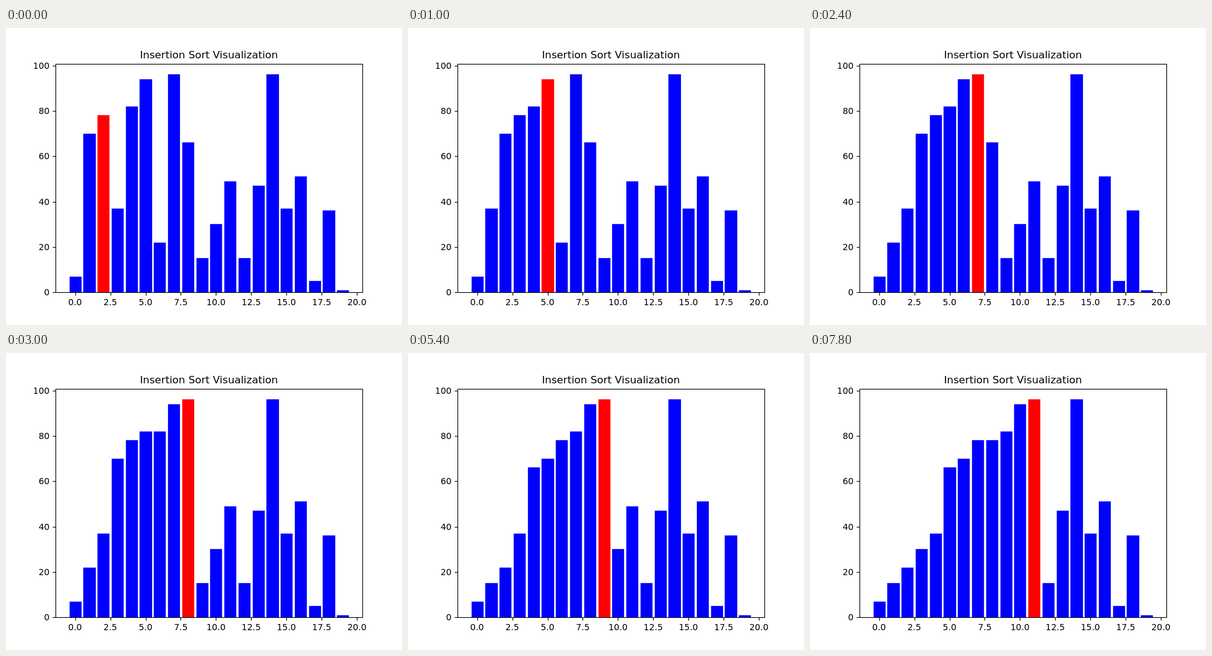
Write an HTML page that moves like this. It is 640 by 480 pixels and loops after 8000 ms.

```html
<!DOCTYPE html>
<html lang="en">
<head>
<meta charset="utf-8">
<title>Insertion Sort Visualization</title>
<style>
  html, body { margin: 0; width: 100%; height: 100%; overflow: hidden; background: #fff; }
  svg { display: block; }
  text { font-family: "DejaVu Sans", sans-serif; font-size: 13.889px; }
  .title { font-size: 16.667px; }
  .axis { fill: none; stroke: #000; stroke-width: 1.111; }
</style>
</head>
<body>
<svg id="chart" width="640" height="480" viewBox="0 0 640 480"></svg>
<script>
const STEP_MS = 200, STEP_COUNT = 40;
const VALUES = [7, 70, 78, 37, 82, 94, 22, 96, 66, 15, 30, 49, 15, 47, 96, 37, 51, 5, 36, 1];
const LEFT = 80, RIGHT = 576, TOP = 57.6, BOTTOM = 427.2;
const BAR_WIDTH = 0.8, EDGE = 0.694;   // EDGE: half the bar outline, in pixels

const chart = document.getElementById('chart');
const toX = value => LEFT + (value + 1.39) * (RIGHT - LEFT) / 21.78;
const toY = value => BOTTOM - value * (BOTTOM - TOP) / 100.8;
const snap = pixel => Math.floor(pixel + 0.5) + 0.5;

function add(tag, attributes, content = '') {
  const node = document.createElementNS(chart.namespaceURI, tag);
  for (const name in attributes) node.setAttribute(name, attributes[name]);
  node.textContent = content;
  return chart.appendChild(node);
}

// One state per shift and one per finished insertion, starting with the third item.
function sortStates(values) {
  const list = [...values], states = [];
  for (let active = 2; active < list.length; active++) {
    const key = list[active];
    const record = () => states.push({ list: [...list], active });
    let slot = active;
    while (slot > 0 && list[slot - 1] > key) {
      list[slot] = list[--slot];
      record();
    }
    list[slot] = key;
    record();
  }
  return states.slice(0, STEP_COUNT);
}

const bars = VALUES.map((_, i) => {
  const left = snap(toX(i - BAR_WIDTH / 2)) - EDGE;
  const right = snap(toX(i + BAR_WIDTH / 2)) + EDGE;
  return add('rect', { x: left, width: right - left });
});

function drawAxes() {
  for (let value = 0; value <= 20; value += 2.5) {
    const x = toX(value);
    add('path', { class: 'axis', d: `M${snap(x)} 427.5v5` });
    add('text', { x, y: 448, 'text-anchor': 'middle' }, value.toFixed(1));
  }
  for (let value = 0; value <= 100; value += 20) {
    const y = toY(value);
    add('path', { class: 'axis', d: `M75.5 ${snap(y)}h5` });
    add('text', { x: 70.3, y: Math.round(y + 5.06), 'text-anchor': 'end' }, value);
  }
  add('rect', { class: 'axis', x: 80.5, y: 58.5, width: 496, height: 369 });
  add('text', { class: 'title', x: 328, y: 49, 'text-anchor': 'middle' }, 'Insertion Sort Visualization');
}

const states = sortStates(VALUES);
let shown = -1;

function render() {
  const step = Math.floor(performance.now() / STEP_MS) % STEP_COUNT;
  if (step !== shown) {
    const { list, active } = states[step];
    bars.forEach((bar, i) => {
      const top = snap(toY(list[i])) - EDGE;
      bar.setAttribute('y', top);
      bar.setAttribute('height', 428 - top);
      bar.setAttribute('fill', i === active ? '#f00' : '#00f');
    });
    shown = step;
  }
  requestAnimationFrame(render);
}

drawAxes();
render();
</script>
</body>
</html>
```
